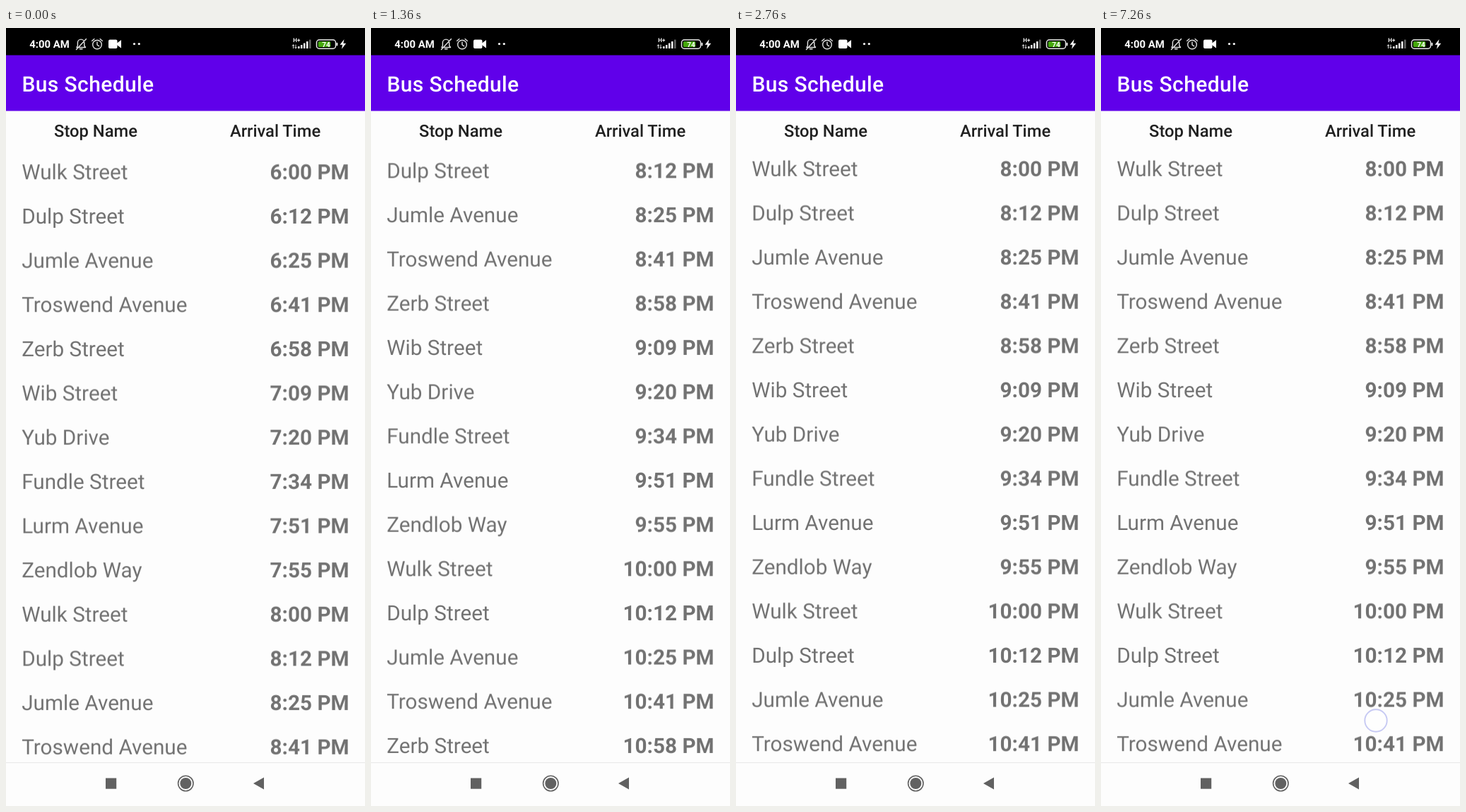
These frames come from a looping animation (508 px wide and 1102 px high, 7.3 s). An HTML page:

```html
<!DOCTYPE html>
<html lang="en">
<head>
<meta charset="utf-8">
<title>Bus Schedule</title>
<style>
  html, body { margin: 0; width: 100%; height: 100%; overflow: hidden; background: #fdfdfd; }
  #stage { display: block; width: 100vw; height: 100vh; }
  text { font-family: Roboto, sans-serif; text-rendering: geometricPrecision; }
  .row text { font-size: 29.7px; fill: rgba(0, 0, 0, .55); }
  .row .time { font-weight: 700; text-anchor: end; }
  .title { font-size: 30px; font-weight: 500; letter-spacing: .0125em; fill: #fff; }
  .head { font-size: 23.75px; font-weight: 500; text-anchor: middle; fill: #202020; }
  .anim { animation: 7300ms linear infinite; }

  #main { animation-name: main; animation-timing-function: step-end; }
  #detail { animation-name: detail; animation-timing-function: step-end; }
  #list { animation-name: scroll; }
  .ripple { transform-box: fill-box; transform-origin: center; opacity: 0; }
  #brush { animation-name: brush; }
  #press { animation-name: press; }
  #kept { animation-name: kept; }
  #back { animation-name: back; }
  #toast { transform-origin: 253.6px 847px; animation-name: toast; }
  #toast rect { filter: drop-shadow(0 17px 15px rgba(0, 0, 0, .11)); }
  #toast text { font-size: 21.8px; fill: #111; text-anchor: middle; }
  #ring { animation-name: ring; }

  @keyframes main {
    0% { visibility: visible; }
    48.493% { visibility: hidden; }
    72.466%, 100% { visibility: visible; }
  }
  @keyframes detail {
    0% { visibility: hidden; }
    48.493% { visibility: visible; }
    72.466%, 100% { visibility: hidden; }
  }
  @keyframes scroll {
    0%, 5.616% { transform: translateY(0); }
    7.671% { transform: translateY(-90px); }
    9.315% { transform: translateY(-200px); }
    10.959% { transform: translateY(-285px); }
    13.014% { transform: translateY(-338px); }
    14.11%, 14.65% { transform: translateY(-343px); }
    15.479% { transform: translateY(-430px); }
    17.123% { transform: translateY(-605px); }
    18.63%, 19.17% { transform: translateY(-691px); }
    20.548% { transform: translateY(-738px); }
    22.192% { transform: translateY(-750px); }
    23.836% { transform: translateY(-700px); }
    25.479%, 26.02% { transform: translateY(-632px); }
    26.849%, 100% { transform: translateY(-631px); }
  }
  @keyframes brush {
    0%, 12.055% { opacity: 0; transform: scale(.3); }
    12.6% { opacity: .12; }
    14.11% { opacity: .12; transform: scale(1); }
    14.65% { opacity: .12; transform: scale(1.005); }
    15.753% { opacity: .12; transform: scale(1.1); }
    17.808%, 100% { opacity: 0; transform: scale(1.1); }
  }
  @keyframes press {
    0%, 45.753% { opacity: 0; transform: scale(.2); }
    46.3% { opacity: .12; }
    48.493% { opacity: .12; transform: scale(1.1); }
    48.5%, 100% { opacity: 0; transform: scale(1.1); }
  }
  @keyframes kept {
    0%, 48.493% { opacity: .12; }
    51.37%, 51.91% { opacity: .065; }
    53.836%, 100% { opacity: 0; }
  }
  @keyframes back {
    0%, 70.54% { opacity: 0; transform: scale(.3); }
    71.1% { opacity: .22; }
    72.466%, 100% { opacity: .22; transform: scale(1); }
  }
  @keyframes toast {
    0%, 48.493% { opacity: 0; transform: scale(.9); }
    50.959%, 73.973% { opacity: 1; transform: none; }
    74.521%, 75.06% { opacity: 1; transform: translateY(5.5px) scale(.95); }
    76.712%, 100% { opacity: 0; transform: translateY(9px) scale(.9); }
  }
  @keyframes ring {
    0%, 13.69% { opacity: 0; transform: translate(302.5px, 601px); }
    13.7%, 14.65% { opacity: 1; transform: translate(302.5px, 601px); }
    15.479% { opacity: 1; transform: translate(297px, 520px); }
    16.164% { opacity: 0; transform: translate(293px, 450px); }
    23.83% { opacity: 0; transform: translate(283px, 552px); }
    23.84% { opacity: 1; transform: translate(283px, 552px); }
    25.479%, 26.02% { opacity: 1; transform: translate(281px, 620px); }
    27.123% { opacity: 0; transform: translate(281px, 620px); }
    36.15% { opacity: 0; transform: translate(254.5px, 540.5px); }
    36.16%, 36.7% { opacity: 1; transform: translate(254.5px, 540.5px); }
    37.808% { opacity: 0; transform: translate(254.5px, 540.5px); }
    59.3% { opacity: 0; transform: translate(64px, 78px); }
    59.31%, 60% { opacity: 1; transform: translate(64px, 78px); }
    61.507% { opacity: 0; transform: translate(64px, 78px); }
    99.44% { opacity: 0; transform: translate(389px, 981px); }
    99.45%, 100% { opacity: 1; transform: translate(389px, 981px); }
  }
</style>
</head>
<body>
<svg id="stage" viewBox="0 0 508 1102">
  <defs>
    <clipPath id="window"><rect y="171" width="508" height="870"/></clipPath>
  </defs>
  <rect width="508" height="1102" fill="#fdfdfd"/>
  <rect y="38" width="508" height="79.5" fill="#6000ea"/>

  <g id="main" class="anim">
    <text class="title" x="22.5" y="89.6">Bus Schedule</text>
    <text class="head" x="127" y="154">Stop Name</text>
    <text class="head" x="381" y="154">Arrival Time</text>
    <g clip-path="url(#window)"><g id="list" class="anim"></g></g>
  </g>

  <g id="detail" class="anim">
    <circle id="back" class="anim ripple" cx="38.5" cy="77" r="32" fill="#fff"/>
    <path transform="translate(21.6 60.1) scale(1.41)" fill="#fff"
      d="M20 11H7.83l5.59-5.59L12 4l-8 8 8 8 1.41-1.41L7.83 13H20z"/>
    <text class="title" x="101.4" y="89.6">Wib Street</text>
    <g id="stops"></g>
  </g>

  <g id="toast" class="anim">
    <rect x="185" y="818" width="137.4" height="58" rx="17" fill="#fdfdfd" stroke="#ebebeb"/>
    <text x="253.7" y="855.3">Wib Street</text>
  </g>

  <!-- status bar -->
  <rect width="508" height="38.5"/>
  <g fill="#fff">
    <text x="33.3" y="28.3" font-size="14.9" font-weight="700">4:00 AM</text>
    <g fill="none" stroke="#e4e4e4" stroke-width="1.4" stroke-linecap="round" stroke-linejoin="round">
      <path d="M100 27.5h12.5l-1.7-2.5v-4.2a4.7 4.7 0 0 0-9.4 0v4.2zM104.5 29.8h3.5M113.5 15.5l-14 15"/>
      <circle cx="129" cy="23.5" r="6.3"/>
      <path d="M129 20v4l2.7 1.7M121.7 18.2l3.2-2.7M136.3 18.2l-3.2-2.7"/>
    </g>
    <rect x="145" y="16.5" width="12.5" height="12.5" rx="2"/>
    <path d="M157 21.5l6-4.5v11.5l-6-4.5z"/>
    <circle cx="181.5" cy="22.5" r="1.6"/>
    <circle cx="188.3" cy="22.5" r="1.6"/>
    <text x="406.3" y="20.3" font-size="8" font-weight="700">H+</text>
    <path d="M406.5 29v-5M405 25.5l1.5-2 1.5 2M410 23.5v5M408.5 27l1.5 2 1.5-2" fill="none" stroke="#ddd"/>
    <path d="M413 26h2.5v3H413zM417 24h2.5v5H417zM421 21.5h2.5v7.5H421zM425 19h2.5v10H425z"/>
    <path d="M429 16.5h2.5V29H429z" fill="#666"/>
    <rect x="439.5" y="16.8" width="27" height="12.4" rx="3.8" fill="none" stroke="#e8e8e8" stroke-width="1.5"/>
    <rect x="441.8" y="19" width="17.5" height="8" rx="1.6" fill="#45a80d"/>
    <rect x="467.5" y="20.8" width="1.8" height="4.4" rx=".8"/>
    <text x="453" y="26.7" font-size="10" font-weight="700" text-anchor="middle">74</text>
    <path d="M478.5 16l-6 7.8h3.7l-1.2 6 6.2-8h-3.9z"/>
  </g>

  <!-- navigation bar -->
  <rect y="1040.5" width="508" height="61.5" fill="#fdfdfd"/>
  <rect y="1040" width="508" height="1.2" fill="#e9e9e9"/>
  <g fill="#616161">
    <rect x="141" y="1062.5" width="15.2" height="15.2"/>
    <circle cx="254.3" cy="1070" r="8"/>
    <circle cx="254.3" cy="1070" r="10.7" fill="none" stroke="#616161" stroke-width="1.6"/>
    <path d="M350 1070l15-8.5v17z"/>
  </g>

  <g id="ring" class="anim">
    <circle r="15.7" fill="#fff" fill-opacity=".35" stroke="#c6c9f3" stroke-width="1.9"/>
  </g>
</svg>
<script>
  const PITCH = 62.65;
  const stops = [
    ["Wulk Street", 0], ["Dulp Street", 12], ["Jumle Avenue", 25], ["Troswend Avenue", 41],
    ["Zerb Street", 58], ["Wib Street", 69], ["Yub Drive", 80], ["Fundle Street", 94],
    ["Lurm Avenue", 111], ["Zendlob Way", 115]
  ];
  const trips = [6, 8, 10].flatMap(hour => stops.map(([name, min]) => ({
    name,
    time: `${hour + Math.floor(min / 60)}:${String(min % 60).padStart(2, "0")} PM`
  })));

  const circle = id => `<circle id="${id}" class="anim ripple" cx="254" cy="31.3" r="254"/>`;
  const fill = id => `<rect id="${id}" class="anim" width="508" height="${PITCH}"/>`;

  function rows(list, top, marks) {
    return list.map(({ name, time }, i) => `
      <svg class="row" y="${top + i * PITCH}" width="508" height="${PITCH}">
        ${marks[i] || ""}
        <text x="22.2" y="43.1">${name}</text>
        <text class="time" x="485.6" y="43.1">${time}</text>
      </svg>`).join("");
  }

  const put = (id, html) => { document.getElementById(id).innerHTML = html; };
  put("list", rows(trips, 171.3, { 11: circle("brush"), 15: circle("press") }));
  put("stops", rows(trips.filter((_, i) => i % 10 === 5), 117.3, { 1: fill("kept") }));
</script>
</body>
</html>
```
